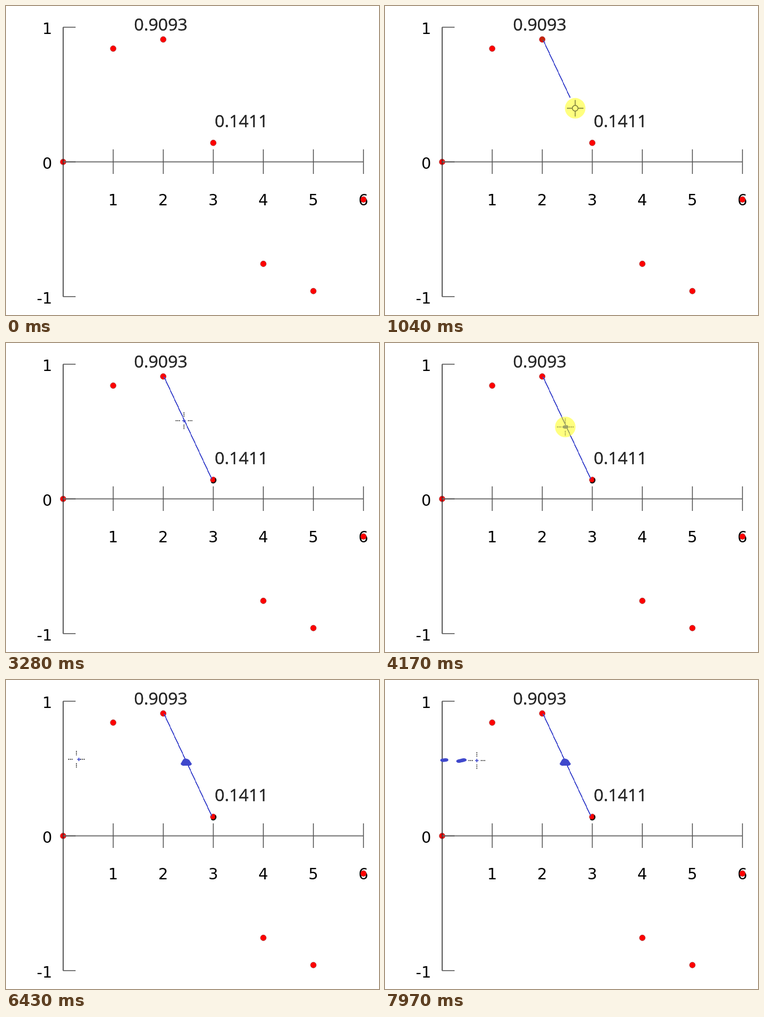
Write an HTML page that moves like this. It is 654 px wide and 541 px high and loops after 8 s.

```html
<!DOCTYPE html>
<html lang="en">
<head>
<meta charset="utf-8">
<title>Linear interpolation sketch</title>
<style>
  html, body { margin: 0; width: 100%; height: 100%; overflow: hidden; background: #fff; }
  svg { display: block; width: 654px; height: 541px; }
  .tick { font: 27px "DejaVu Sans", sans-serif; fill: #000; }
  .value { font: 30px "Open Sans", "Noto Sans", sans-serif; fill: #222; stroke: #222; stroke-width: .4; }
  .axis { stroke: #868686; stroke-width: 2.2; fill: none; }
  .thin { stroke: #555; stroke-width: 1.5; fill: none; }
</style>
</head>
<body>
<svg viewBox="0 0 654 541">
  <g id="plot"></g>
  <path id="shade" d="M366.500 237A4.500 4.500 0 0 1 360 243.500" fill="none" stroke="#111" stroke-width="2.200"/>
  <line id="line" x1="277" y1="59" stroke="#3f48cc" stroke-width="1.700" shape-rendering="crispEdges"/>
  <circle id="grip" cx="276" cy="58" r="4" fill="#8a4a10" opacity=".5"/>
  <g transform="scale(1.7 1)">
    <g id="ink" fill="none" stroke="#3f48cc" stroke-width="6" stroke-linecap="round" stroke-linejoin="round"></g>
  </g>
  <circle id="glow" r="18" fill="#ff0" opacity=".5"/>
  <g id="cursor" fill="none" stroke-width="1.400">
    <path id="target" d="M-5 0A5 5 0 0 1 5 0A5 5 0 0 1 -5 0M-14.500 0H-5M5 0H14.500M0 -14.500V-5M0 5V14.500"/>
    <path id="cross" d="M-14.500 0H-7M7 0H14.500M0 -14.500V-7M0 7V14.500" stroke-dasharray="1.6 1.4"/>
  </g>
  <path id="tip" d="M-3 0H3M0 -3V3" stroke="#3f48cc" stroke-width="1.600"/>
</svg>
<script>
const LOOP = 8000, LAG = 35, LINE_DONE = 2330, PEN_TOOL = 2400;
const $ = id => document.getElementById(id);

// pointer moves: start, end, x, y; each eases out from the previous place
const moves = [
  [0, 0, 614, -8], [60, 430, 273, 72], [430, 580, 276, 58],
  [860, 1280, 361, 237], [1770, 2060, 253, -18],
  [2400, 2400, 271, -18], [2470, 3250, 312, 136], [3280, 4070, 317, 147],
  [5850, 6570, 116, 138.5],
  [6670, 6850, 102, 140.5], [6850, 7200, 106, 140], [7200, 7430, 122, 141],
  [7530, 7600, 130, 142], [7600, 7780, 138, 140], [7780, 7930, 161, 141]
];
const drag = [860, 1775], scribble = [4170, 5750];
const strokes = [[4000, 5860], [6850, 7200], [7600, 7780]];

const clamp = u => Math.min(1, Math.max(0, u));
const within = (t, [a, b]) => t >= a && t < b;

// side-to-side strokes that build up a small triangle
function scrub(k) {
  const side = Math.sin(k * Math.PI * 10);
  const lift = 8 * clamp((k - 0.55) / 0.4) * (1 - Math.abs(side));
  return [316 + 4.5 * side, 147 - lift];
}

function pos(t) {
  const [a, b] = scribble;
  if (within(t, scribble)) return scrub((t - a) / (b - a));
  let x = 0, y = 0;
  for (const [t0, t1, tx, ty] of moves) {
    if (t < t0) break;
    const u = t1 > t0 ? clamp((t - t0) / (t1 - t0)) : 1, e = 1 - (1 - u) ** 2;
    x += (tx - x) * e;
    y += (ty - y) * e;
  }
  return [x, y];
}

function buildPlot() {
  const px = i => 100.2 + 87.75 * i, py = v => 273 - 235.8 * v;
  const dot = i => `<circle cx="${px(i)}" cy="${py(Math.sin(i))}" r="5.1" fill="#f00" stroke="#833" stroke-width=".6"/>`;
  const text = (cls, x, y, s, anchor) => `<text class="${cls}" x="${x}" y="${y}" text-anchor="${anchor}">${s}</text>`;
  let out = dot(0) + '<path class="axis" d="M100 272.800H627"/><path d="M100.300 37V509" stroke="#2a2a2a" stroke-width="1.500"/>';
  for (const v of [1, 0, -1])
    out += `<path class="thin" d="M100 ${py(v)}h22"/>` + text("tick", 81, py(v) + 12, v, "end");
  for (let i = 1; i <= 6; i++)
    out += `<path class="thin" d="M${px(i)} 251V294"/>` + text("tick", px(i), 349, i, "middle") + dot(i);
  out += text("value", 224.5, 43, "0.9093", "start") + text("value", 366, 212, "0.1411", "start");
  $("plot").innerHTML = out;
  $("ink").innerHTML = strokes.map(() => "<polyline/>").join("");
}

const show = (id, on) => $(id).setAttribute("visibility", on ? "visible" : "hidden");
const move = (id, p) => $(id).setAttribute("transform", `translate(${p[0]} ${p[1]})`);

function drawInk(t) {
  strokes.forEach(([a, b], i) => {
    const pts = [], end = Math.min(t, b);
    const add = s => { const [x, y] = pos(s); pts.push(`${x / 1.7},${y}`); };
    for (let s = a; s < end; s += 20) add(s);
    if (t >= a) add(end);
    $("ink").children[i].setAttribute("points", pts.join(" "));
  });
}

function draw(t) {
  const pen = t > PEN_TOOL, late = pos(t - LAG);
  const pressed = within(t, drag) || strokes.some(s => within(t, s));
  const [ex, ey] = t < drag[1] ? late : [361, 238.5];
  $("line").setAttribute("x2", ex);
  $("line").setAttribute("y2", ey);
  show("line", t > drag[0]);
  show("grip", t > drag[0] && t < LINE_DONE);
  show("shade", t >= LINE_DONE);
  drawInk(t);
  move("cursor", pos(t));
  move("glow", pos(t));
  move("tip", late);
  $("cursor").setAttribute("stroke", pressed ? "#77773a" : pen ? "#000" : "#666");
  show("glow", pressed);
  show("target", t >= 60 && !pen);
  show("cross", pen);
  show("tip", pen && !pressed);
}

function tick(now) {
  draw(now % LOOP);
  requestAnimationFrame(tick);
}

buildPlot();
draw(0);
requestAnimationFrame(tick);
</script>
</body>
</html>
```
